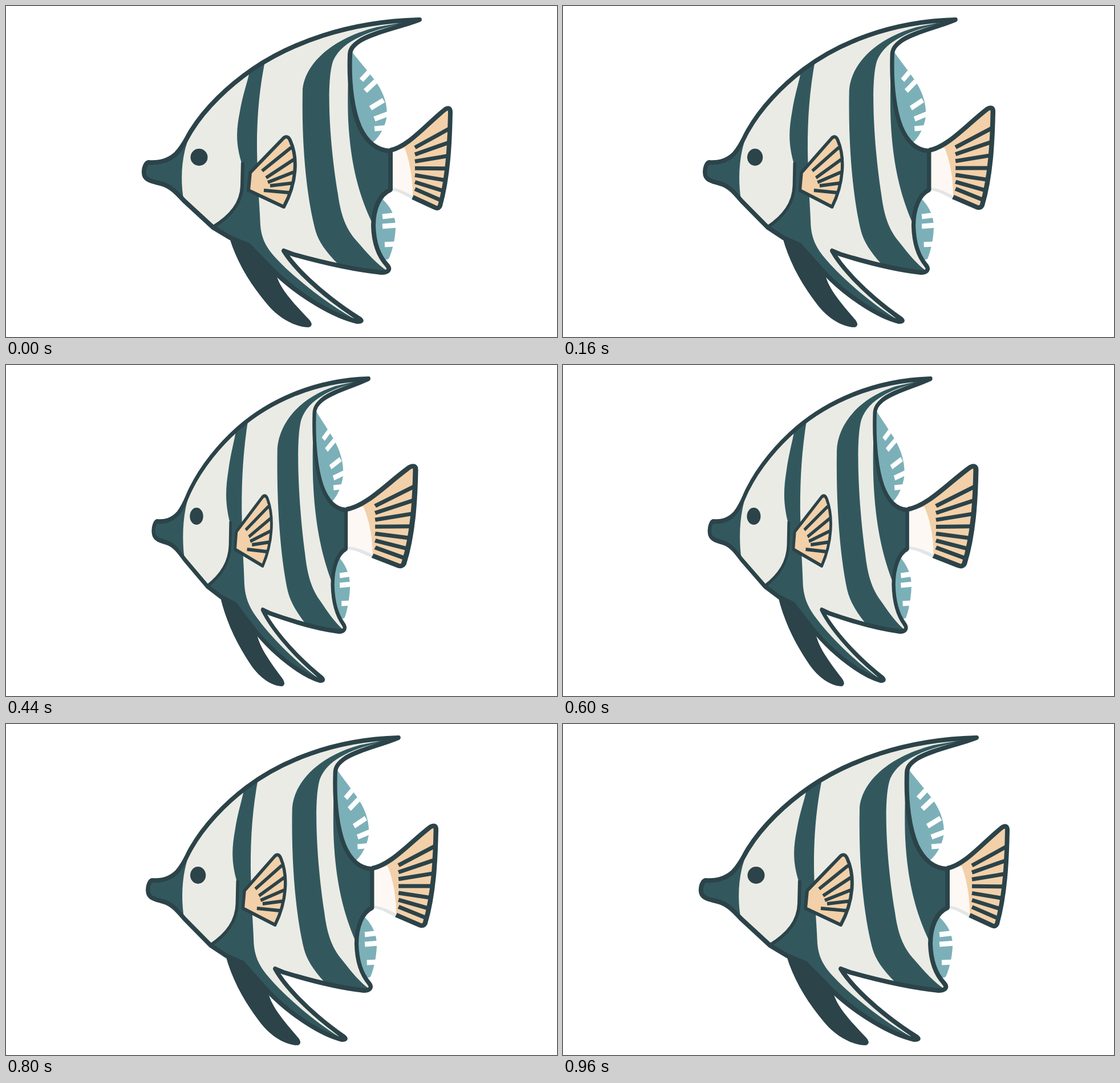
These frames come from a looping animation (966x580 px, 1000 ms). An HTML page:

```html
<!DOCTYPE html>
<html lang="en">
<head>
<meta charset="utf-8">
<title>Swimming fish</title>
<style>
  html, body { margin: 0; width: 100%; height: 100%; overflow: hidden; background: #fff; }
  svg { display: block; width: 100vw; height: 100vh; }
  .line { fill: none; stroke: #2b4349; stroke-width: 8; stroke-linejoin: round; }
  .thin { stroke-width: 6; }
  .dark { fill: #2b4349; }
  .teal { fill: #32585e; }
  .pale { fill: #ebebe5; }
  .blue { fill: #7cb0b8; }
  .sand { fill: #f2d0a9; }
  .notch { fill: none; stroke: #fff; stroke-width: 9; }
</style>
</head>
<body>
<svg viewBox="0 0 966 580">
  <defs>
    <path id="shape" d="M242 293C241 284 245 275 250 274C264 275 282 273 297 260C312 245 316 232 325 218C350 178 390 140 432 111C498 66 598 27 725 24
      C690 37 646 46 622 60C608 69 603 76 603 86C601 140 608 185 620 212C632 238 650 253 674 254L674 322
      C655 330 644 355 644 385C645 420 655 440 668 454C675 462 670 467 658 467C610 462 560 451 503 435L487 429
      C503 455 547 502 621 549Q626 553 616 553C575 544 515 508 473 468L425 419L393 406L363 388L312 341
      C299 327 288 315 271 311C252 307 242 303 242 293Z"/>
    <clipPath id="inside"><use href="#shape"/></clipPath>
  </defs>

  <g id="tail">
    <path class="sand" d="M675 253C705 247 735 209 770 181Q779 176 779 186C778 240 775 300 761 350Q758 356 752 353L713 336L690 325L675 322Z"/>
    <path fill="#fdf8f3" d="M675 252L699 249C709 275 714 310 713 338L690 326L675 322Z"/>
    <path fill="#e3e6e6" d="M675 318C690 320 704 327 713 333L713 339L690 327L675 322Z"/>
    <path class="line" style="stroke-width:7" id="rays"/>
    <path class="line" d="M673 253C705 247 735 209 770 181Q779 176 779 186C778 240 775 300 761 350Q758 356 752 353L713 335"/>
  </g>

  <g id="body">
    <path class="blue" d="M605 78C615 92 628 106 636 117C656 140 668 162 668 190C666 210 655 230 643 239L608 205Z"/>
    <path class="blue" d="M652 332C670 345 684 365 683 390C682 410 677 430 671 443L660 447L640 385Z"/>
    <path class="notch" d="M623 130L636 116M630 149L648 132M639 179L662 165M646 198L670 189M646 215L670 213M660 369L687 366M660 386L687 384M664 418L687 417"/>
    <path class="dark" d="M392 407C405 450 430 490 460 525C480 548 508 563 531 563Q540 560 532 550C505 522 480 495 474 471L425 418Z"/>
    <use href="#shape" class="teal"/>
    <g clip-path="url(#inside)" class="pale">
      <path d="M323 226C309 255 304 300 312 343L362 388C400 360 412 340 413 318L413 275C402 240 404 215 410 185C415 155 423 135 427 115L400 90L300 190Z"/>
      <path d="M455 92C443 150 440 200 440 250C441 320 445 350 446 385C449 420 468 436 486 455C515 483 565 523 612 549C575 520 530 480 486 428L582 452C560 430 548 412 543 395C528 340 518 250 520 150C521 110 560 60 650 37L700 28L560 30Z"/>
      <path d="M700 30C640 42 590 60 574 95C560 130 568 250 582 330C588 375 600 395 615 412C635 435 650 452 668 464L672 452C655 440 642 415 643 382C620 335 604 280 600 200C598 150 601 110 602 82C610 62 650 48 720 27Z"/>
    </g>
    <use href="#shape" class="line"/>
    <path class="line thin" d="M415 274L414 315C413 345 395 368 362 388"/>
    <circle class="dark" cx="338.5" cy="265" r="15"/>
    <path class="sand" d="M428 292L487 231Q494 226 498 235C512 265 510 310 487 352L425 323Z"/>
    <path class="line thin" d="M428 292L487 231Q494 226 498 235C512 265 510 310 487 352L425 323ZM449 289L501 247M456 301L506 268M459 309L507 290M463 315L505 310M452 323L496 327"/>
  </g>
</svg>
<script>
  const $ = id => document.getElementById(id);
  const PIVOT = 318, JOINT = 674, STEP = 40, HALF = 12;

  let rays = "";
  for (let i = 0; i < 7; i++)
    rays += `M717 ${248 + 12.1 * i}L${777 - 2.2 * i} ${215 + 25.5 * i - 0.75 * i * i}`;
  $("rays").setAttribute("d", rays);

  function draw(now) {
    const frame = Math.floor(now / STEP) % 25;
    const t = 1 - Math.abs(frame - HALF) / HALF;
    const squeeze = t + t * t - t * t * t;
    const s = 1 - 0.222 * squeeze;
    const stretch = 1 + 0.145 * squeeze;
    const skew = -0.022 * squeeze;
    const joint = PIVOT + (JOINT - PIVOT) * s + 2 * squeeze;
    $("body").setAttribute("transform", `matrix(${s} 0 0 1 ${PIVOT * (1 - s)} 0)`);
    $("tail").setAttribute("transform",
      `matrix(${stretch} ${skew} 0 1 ${joint - JOINT * stretch} ${-JOINT * skew})`);
    requestAnimationFrame(() => draw(performance.now()));
  }
  draw(0);
</script>
</body>
</html>
```
